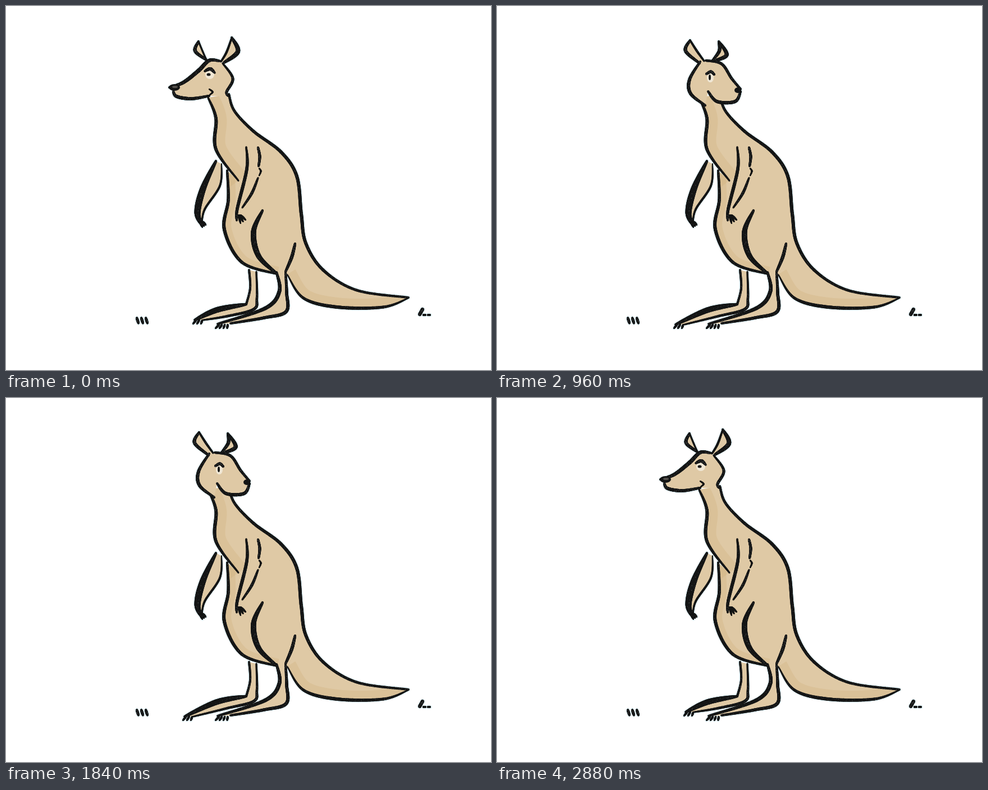
An HTML page with a canvas for the animation above (2.96 s loop, 864 by 648 pixels).

```html
<!DOCTYPE html>
<html lang="en">
<head>
<meta charset="utf-8">
<title>Kangaroo looking around</title>
<style>
html, body { margin: 0; width: 100%; height: 100%; overflow: hidden; background: #fff; }
canvas { display: block; width: 864px; height: 648px; }
</style>
</head>
<body>
<canvas id="stage" width="864" height="648"></canvas>
<script>
const ctx = document.getElementById('stage').getContext('2d');
const INK = '#141515', TAN = '#dfc9a5', SHADE = 'rgba(201,163,105,.22)', GLOW = '#e8f7fb';
const STEP = 80, LOOP = 2960;

let seed = 1;
const rand = () => (seed = seed * 16807 % 2147483647) / 2147483647;

// A brush stroke through key points, "full" wide in the middle and "tip" wide at its ends.
function line(full, tip, ...xy) {
  const n = xy.length / 2, out = [];
  const at = (i, k) => xy[Math.max(0, Math.min(n - 1, i)) * 2 + k];
  for (let i = 0; i < n - 1; i++) {
    for (let j = 0; j <= 24; j++) {
      const t = j / 24;
      const [x, y] = [0, 1].map(k => {
        const a = at(i - 1, k), b = at(i, k), c = at(i + 1, k), d = at(i + 2, k);
        return b + t * (c - a + t * (2 * a - 5 * b + 4 * c - d + t * (3 * (b - c) + d - a))) / 2;
      });
      out.push([x, y, tip + (full - tip) * Math.sin(Math.PI * (i + t) / (n - 1))]);
    }
  }
  return out;
}

// A row of short strokes: claws, toes and grass.
const fan = (n, x, y, gap, dx, dy, spread = 0, lift = 0) =>
  Array.from({ length: n }, (_, i) =>
    line(4, 2, x + gap * i, y, x + gap * i + dx + spread * i, y + dy - lift * i));

const body = {
  back: line(6, 4, 397,157, 407,187, 441,223, 490,260, 518,303, 526,370, 534,422, 565,470, 625,506, 717,519),
  tail: line(6, 2, 717,520, 672,536, 590,536, 530,520, 501,478),
  neck: line(6, 3, 360,163, 374,200, 374,255, 414,311),
  belly: line(6, 4, 394,293, 396,345, 389,398, 420,456, 483,477),
  legBack: line(6, 4, 498,474, 500,510, 499,544, 460,555, 400,565),
  legFront: line(7, 4, 482,474, 487,508, 462,538, 377,566),
  shin: line(4, 4, 433,470, 435,502, 428,531),
  farOuter: line(12, 4, 374,276, 351,325, 341,368, 350,391),
  farInner: line(4, 2, 384,281, 381,320, 354,362, 349,388)
};
const details = [
  line(10, 4, 457,364, 441,402, 450,445, 483,477),
  line(6, 4, 515,423, 509,447, 498,473),
  line(6, 3, 428,251, 429,290, 412,361, 411,382),
  line(5, 4, 449,252, 452,268, 450,285),
  line(3, 2, 451,289, 454,294, 451,302),
  line(5, 3, 449,306, 438,333, 421,359),
  ...fan(3, 414, 372, 2, 4, 15, 2.5, 3),
  ...fan(3, 345, 384, 3, 5, 10, 0, 2),
  ...fan(4, 380, 567, 5, -7, 7, 2),
  ...fan(3, 233, 555, 8, 3, 10).map(s => s.map(([x, y, w]) => [x, y, w + 1]))
];

const heads = {
  left: {
    face: [
      line(7, 4, 291,145, 316,136, 343,115, 362,97, 381,98),
      line(5, 3, 386,102, 404,129, 393,153, 397,161),
      line(6, 4, 362,160, 330,165, 304,161, 298,152)
    ],
    ears: [
      [line(6, 4, 357,96, 337,80, 343,63), line(3, 3, 343,63, 350,80, 357,96)],
      [line(8, 4, 388,101, 413,81, 402,56), line(4, 3, 402,57, 393,82, 383,99)]
    ],
    marks: [line(6, 3, 354,116, 364,112, 372,119), line(3, 2, 362,148, 368,153, 363,158)],
    eyes: [[363, 122, 8, 8, 361, 122, 3.5, 2.5]],
    nose: [300, 145, 10, 6]
  },
  right: {
    face: [
      line(6, 4, 371,177, 345,156, 343,131, 362,99),
      line(5, 4, 372,97, 400,103, 418,129, 434,148),
      line(6, 4, 434,152, 424,170, 392,170, 376,152)
    ],
    ears: [
      [line(6, 4, 361,102, 336,80, 344,61), line(4, 3, 344,61, 356,80, 369,98)],
      [line(7, 4, 386,98, 409,87, 395,63), line(6, 3, 395,64, 396,80, 383,98)]
    ],
    marks: [line(5, 4, 373,121, 381,117, 387,122)],
    eyes: [[380, 128, 6, 8, 379, 127, 2, 5]],
    nose: [429, 150, 6, 5]
  },
  front: {
    face: [
      line(6, 4, 362,98, 372,94, 382,97),
      line(5, 4, 392,107, 403,128, 384,173),
      line(5, 4, 384,173, 364,173, 340,130, 358,104)
    ],
    ears: [
      [line(5, 4, 354,103, 335,82, 346,65), line(3, 3, 346,66, 350,82, 358,101)],
      [line(8, 4, 387,105, 409,87, 395,64), line(5, 3, 395,65, 397,80, 385,101)]
    ],
    marks: [line(3, 3, 349,116, 355,112, 360,115), line(4, 3, 375,114, 381,112, 386,115),
            line(4, 3, 372,162, 374,188)],
    eyes: [355, 380].map(x => [x, 121, 5, 8, x, 119, 2.5, 6]),
    nose: [372, 159, 6, 5]
  }
};

// The lighter drawing: thinner ink and a raised, shorter tail.
function lighten(stroke) {
  return stroke.map(([x, y, w]) => {
    const t = y > 330 && x < 725 ? Math.max(0, (x - 515) / 202) : 0;
    const bend = Math.sin(Math.PI * Math.min(1, t) ** .4);
    return [x + 6 * bend - 10 * t, y - 9 * bend, 1.5 + w / 2];
  });
}

function dot(x, y, rx, ry = rx) {
  ctx.beginPath();
  ctx.ellipse(x, y, rx, ry, 0, 0, 7);
  ctx.fill();
}

function brush(stroke, colour, grow = 0) {
  ctx.strokeStyle = colour;
  ctx.lineCap = 'round';
  for (let i = 1; i < stroke.length; i++) {
    const [x, y] = stroke[i - 1], [u, v, w] = stroke[i];
    ctx.lineWidth = w + grow;
    ctx.beginPath();
    ctx.moveTo(x, y);
    ctx.lineTo(u, v);
    ctx.stroke();
  }
}

function ink(stroke) {
  brush(stroke, INK);
  for (const [x, y, w] of stroke) {
    if (w < 4 || rand() > .7) continue;
    ctx.fillStyle = `rgba(115,118,120,${.2 + rand() * .4})`;
    dot(x + (rand() - .5) * w * .8, y + (rand() - .5) * w * .8, .4 + rand() * .4);
  }
}

const flip = s => [...s].reverse();

function shape(...parts) {
  const path = new Path2D();
  parts.flat().forEach(([x, y], i) => i ? path.lineTo(x, y) : path.moveTo(x, y));
  path.closePath();
  return path;
}

function draw(light, side) {
  const style = light ? lighten : s => s;
  const [toeX, toeY] = side !== 'left' && !light ? [318, 567] : [336, 559];
  const b = {
    ...body,
    foot: line(10, 4, 428,531, 376,541, toeX,toeY),
    farSole: line(5, 3, 446,473, 447,520, 441,540, 395,552, toeX + 16,toeY)
  };
  for (const k in b) b[k] = style(b[k]);
  const tuft = light
    ? [line(6, 6, 742,534, 737,550), ...fan(2, 747, 545, 9, 1, 4)]
    : [line(6, 6, 742,540, 737,549), ...fan(2, 743, 550, 8, 5, 0)];
  const h = heads[side];
  const face = h.face.map(style), ears = h.ears.map(e => e.map(style));
  const bodyInk = [...Object.values(b), ...details.map(style), ...tuft,
    ...fan(3, toeX + 3, toeY, 5.5, -6, 7, 1.5)];
  const headInk = [...face, ...ears.flat(), ...h.marks.map(style)];
  const torso = shape(b.back, b.tail, flip(b.belly), flip(b.neck));

  seed = light ? 77 : 41;
  ctx.fillStyle = '#fff';
  ctx.fillRect(0, 0, 864, 648);
  [...bodyInk, ...headInk].forEach(s => brush(s, GLOW, 3));

  ctx.fillStyle = TAN;
  ctx.fill(shape(b.farOuter, flip(b.farInner)));
  ctx.fill(shape(b.shin, b.foot, flip(b.farSole)));
  ctx.fill(shape(b.legBack, flip(b.legFront)));
  ctx.fill(torso);

  ctx.save();
  ctx.clip(torso);
  ctx.strokeStyle = SHADE;
  ctx.lineCap = 'butt';
  for (const [s, w] of [[b.neck, 38], [b.belly, 26], [b.tail, 34]]) {
    ctx.lineWidth = w;
    ctx.beginPath();
    s.forEach(([x, y]) => ctx.lineTo(x, y));
    ctx.stroke();
  }
  ctx.restore();
  bodyInk.forEach(ink);

  ctx.fillStyle = TAN;
  ears.forEach(e => ctx.fill(shape(...e)));
  ctx.fill(shape(...face));
  ctx.fillStyle = '#f0e7d5';
  h.eyes.forEach(e => dot(...e.slice(0, 4)));
  headInk.forEach(ink);
  ctx.fillStyle = INK;
  h.eyes.forEach(e => dot(...e.slice(4)));
  dot(...h.nose);
  if (side === 'left') {
    ctx.fillStyle = light ? '#8d7c65' : '#55524d';
    dot(301, 144, 5, light ? 3 : 2);
  }
}

// Two drawings alternate; the beat slips by one while the head is turned.
function pose(n) {
  const side = n === 10 || n === 28 ? 'front' : n > 10 && n < 28 ? 'right' : 'left';
  const slipped = n >= 13 && n < 28;
  return [(n % 2 === 1) !== slipped, side];
}

let shown = -1;
function tick() {
  const n = Math.floor(performance.now() % LOOP / STEP);
  if (n !== shown) {
    shown = n;
    draw(...pose(n));
  }
  requestAnimationFrame(tick);
}
tick();
</script>
</body>
</html>
```
